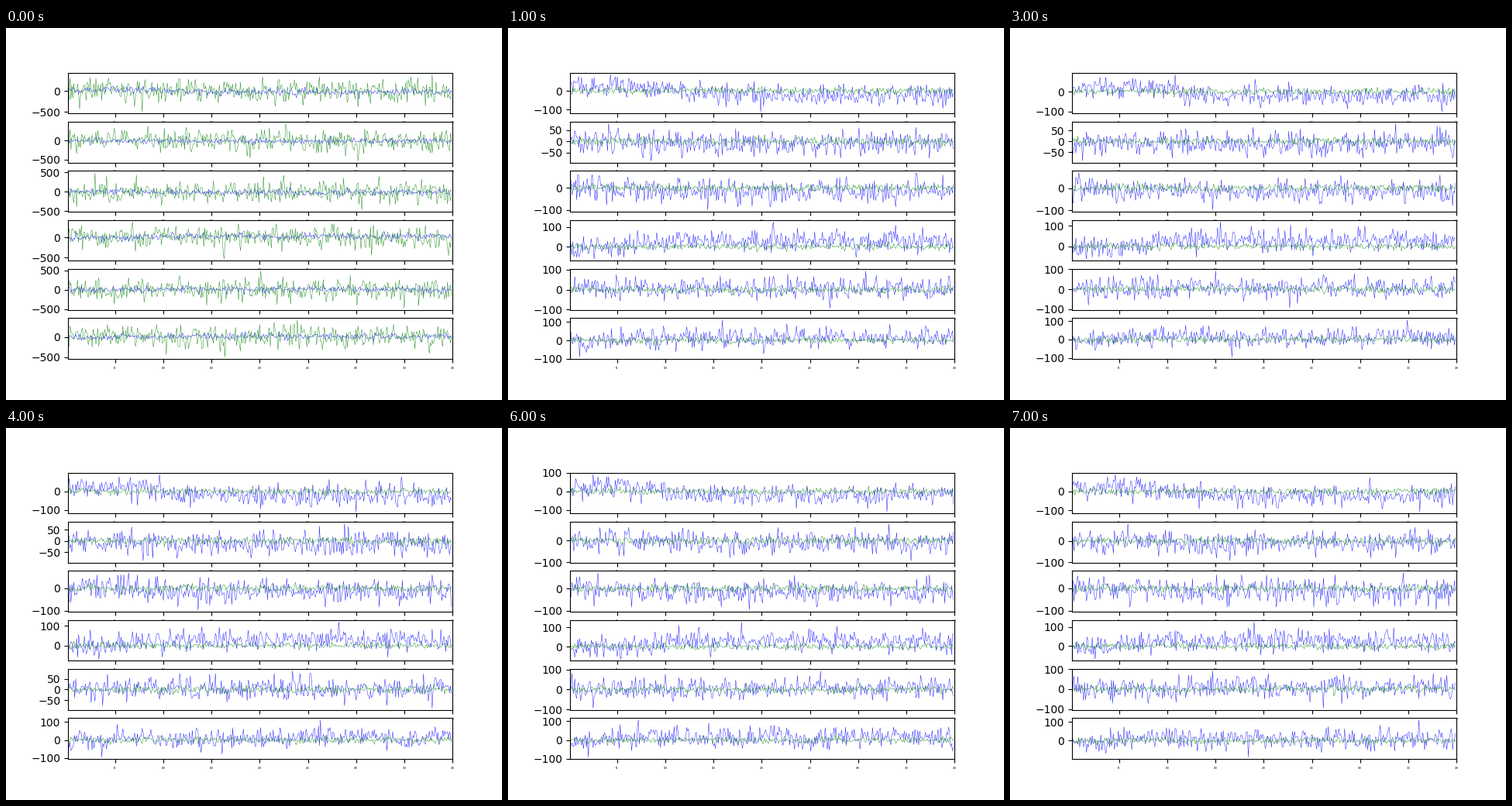
These frames come from a looping animation (640 by 480 pixels, 8 s). A matplotlib script:

```python
import numpy as np
import matplotlib.pyplot as plt
from matplotlib.animation import FuncAnimation

SAMPLES, SECONDS = 400, 8

# Per panel: y limits in the first second, and typical ones later
FIRST_LIMITS = [(-535, 430), (-577, 490), (-520, 540),
                (-577, 438), (-520, 530), (-545, 460)]
LATER_LIMITS = [(-116, 97), (-98, 88), (-105, 77),
                (-75, 133), (-101, 100), (-102, 116)]
# Per panel: level of the blue signal at the start and end, and where it turns
DRIFT = [(22, -22, 110), (-3, -9, 100), (0, -15, 85),
         (-6, 28, 72), (2, 5, 85), (-15, 12, 30)]

x = np.arange(SAMPLES)


def drift(panel):
    start, end, turn = DRIFT[panel]
    return start + (end - start) / (1 + np.exp((turn - x) / 12))


def fit(data, lo, hi):
    """Limit the data so that one peak on each side nearly fills the axes."""
    margin = (hi - lo) / 22
    lo, hi = lo + margin, hi - margin
    low, high = data.argmin(), data.argmax()
    data = np.clip(data, 0.87 * lo, 0.87 * hi)
    data[low], data[high] = lo, hi
    return data


def panel_state(sec, panel):
    rng = np.random.default_rng(100 * sec + panel)
    blue_size, green_size = (45, 150) if sec == 0 else (29, 9)
    blue = rng.normal(drift(panel), blue_size)
    green = rng.normal(0, green_size, SAMPLES)
    if sec == 0:
        lo, hi = FIRST_LIMITS[panel]
        green = fit(green, lo, hi)
    else:
        lo, hi = LATER_LIMITS[panel] * rng.uniform(0.95, 1.05, 2)
        blue = fit(blue, lo, hi)
    return blue, green, lo, hi


plt.rcParams["font.family"] = "DejaVu Sans"
fig, axes = plt.subplots(len(DRIFT), 1, figsize=(6.4, 4.8), dpi=100)
fig.subplots_adjust(left=0.125, right=0.9, bottom=0.11, top=0.88, hspace=0.2)
lines = []
for ax in axes:
    ax.set_xlim(1, SAMPLES)
    ax.set_xticks(range(50, SAMPLES + 1, 50))
    ax.tick_params(axis="x", labelsize=2)
    lines.append([ax.plot(x, 0 * x, color=c, lw=0.3)[0] for c in "bg"])


def update(sec):
    for panel, (ax, (blue_line, green_line)) in enumerate(zip(axes, lines)):
        blue, green, lo, hi = panel_state(sec, panel)
        blue_line.set_ydata(blue)
        green_line.set_ydata(green)
        ax.set_ylim(lo, hi)
    return [line for pair in lines for line in pair]


anim = FuncAnimation(fig, update, frames=SECONDS, interval=1000,
                     init_func=lambda: update(0), repeat=True, blit=False)
plt.show()
```
